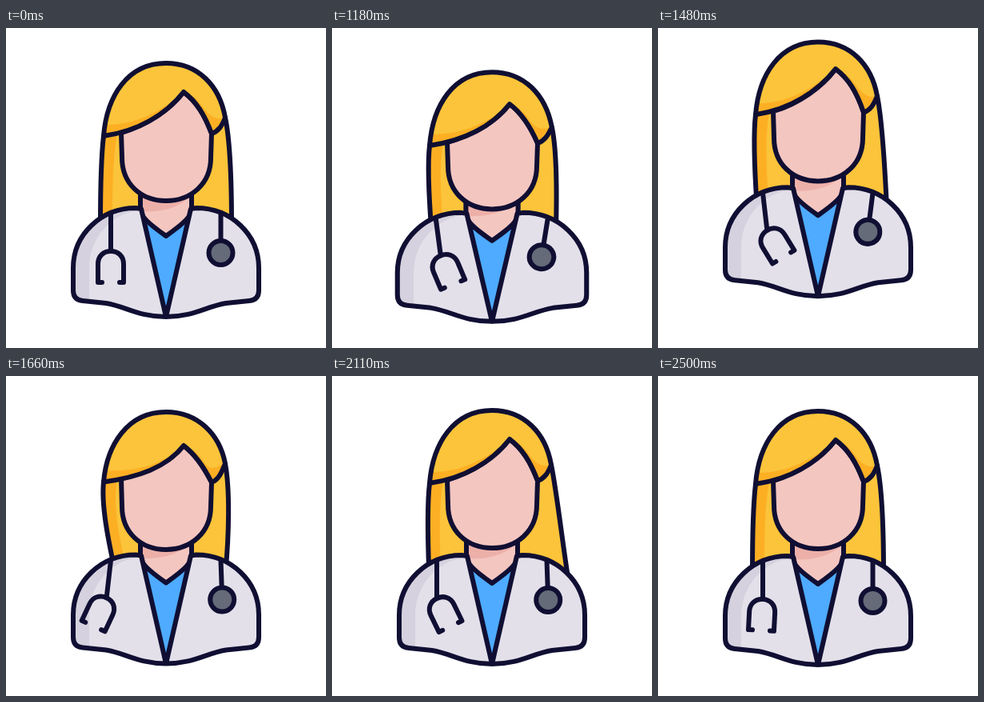
Animation, 400 px wide and 400 px high, one loop 2.53 s. Source, as an HTML page:

```html
<!DOCTYPE html>
<html lang="en">
<head>
<meta charset="utf-8">
<title>Doctor hop</title>
<style>
  html, body { margin: 0; width: 100%; height: 100%; overflow: hidden; background: #fff; }
  svg { display: block; width: 100%; height: 100%; }
  .line { stroke: #100f33; stroke-width: 6; stroke-linecap: round; stroke-linejoin: round; }
</style>
</head>
<body>
<svg viewBox="0 0 400 400" fill="none">
  <path id="back" fill="#fbc43a"/>
  <path id="backShade" fill="#fdaf24"/>
  <path id="backLine" class="line"/>
  <g id="body">
    <path fill="#4eabff" d="M168 226L200 361L232 226Z"/>
    <path fill="#f4c6c0" d="M168 192V226C168 235 176 243 200 260C224 243 232 235 232 226V192Z"/>
    <path fill="#edb0a9" d="M168 192V229C190 231 218 226 232 208V192Z"/>
    <path class="line" d="M168 192V226C168 235 176 243 200 260C224 243 232 235 232 226V192"/>
    <path fill="#e4e0ea" d="M200 361L169 226L162 225C119 225 84 258 84 300V328Q84 340 96 341L125 344C150 348 165 361 200 361C235 361 250 348 275 344L304 341Q316 340 316 328V300C316 258 281 225 238 225L231 226Z"/>
    <path fill="#d5d1de" d="M169 226L162 225C119 225 84 258 84 300V328Q84 340 96 341L104 342V300C104 262 133 229 170 228Z"/>
    <path class="line" d="M200 361L169 226L162 225C119 225 84 258 84 300V328Q84 340 96 341L125 344C150 348 165 361 200 361C235 361 250 348 275 344L304 341Q316 340 316 328V300C316 258 281 225 238 225L231 226Z"/>
    <g id="tube" class="line">
      <path d="M131 232V279"/>
      <path id="fork" d="M120 318H115V295C115 285 122 279 131 279C140 279 147 285 147 295V318H142"/>
    </g>
    <g id="disc" class="line">
      <path d="M268.500 232V266"/>
      <circle cx="268.500" cy="281" r="15" fill="#656b78"/>
    </g>
  </g>
  <path id="face" class="line" fill="#f4c6c0"/>
  <path id="cap" fill="#fbc43a"/>
  <path id="capShade" fill="#fdaf24"/>
  <path id="capLine" class="line"/>
</svg>
<script>
const LOOP = 2530, START = 1030, STEP = 30;
const times = [1000, 1030, 1120, 1300, 1530, 1660, 1780, 1900, 2000, 2110, 2190, 2320, 2500];

// One value per key time: offsets in px, swings in degrees (positive is inward).
const tracks = {
  body:  [0, 3.7, 10, -10.5, -27, -1.5, 10, 3.5, 0, -1, -1.5, 2.8, 0],
  wide:  [0, 1, 3, 0, 0, 0, 3, 2, 0, 0, 0, 0.8, 0],
  head:  [0, 4.5, 16, -8, -28, 1, 30, 21, 6, -1, -3, 2.5, 0],
  nod:   [0, 0.3, 4, 3, -3, 6, 10, 9, 3, 0, 0, 0, 0],
  side:  [0, 0, 2, -2.5, 0, -3.5, 4, 4, 1, 0, 0, 0, 0],
  tipL:  [0, 0, 2, 13, 4, 17, -4, -11, -6, 3, 3, -2, 0],
  tipR:  [0, 0, -2, -1, 4, -7, -12, -16, 0, 11, 8, -3, 0],
  tube:  [0, 0, 4, 12.5, 4, -6.5, 0, 13.5, 8, 0, -3, 1, 0],
  fork:  [0, 0, 10, 44, 25, -25, -20, 32, 42, 26, 5, -8, -3],
  disc:  [0, 0, 4, 17.7, 4, -2, 5, 23, 8, -2, -2, 1, 0]
};

const $ = id => document.getElementById(id);
const draw = (id, d) => $(id).setAttribute('d', d);
const move = (id, value) => $(id).setAttribute('transform', value);

// Monotone cubic through the keys, so extremes fall on the keys.
function sample(v, t) {
  const last = times.length - 1;
  if (t >= times[last]) return v[last];
  let i = 0;
  while (t >= times[i + 1]) i++;
  const slope = k => (v[k + 1] - v[k]) / (times[k + 1] - times[k]);
  const tangent = k => {
    if (k === 0 || k === last) return 0;
    const a = slope(k - 1), b = slope(k);
    return a * b <= 0 ? 0 : 2 * a * b / (a + b);
  };
  const span = times[i + 1] - times[i], u = (t - times[i]) / span, w = 1 - u;
  return v[i] * w * w * (1 + 2 * u) + v[i + 1] * u * u * (3 - 2 * u)
    + span * u * w * (tangent(i) * w - tangent(i + 1) * u);
}

function render(t) {
  const p = {};
  for (const name in tracks) p[name] = t < START ? 0 : sample(tracks[name], t);
  const h = p.head, f = h * 0.93, s = h + p.side, n = h + p.nod;
  const low = h + Math.max(0, p.side);
  const leftY = 135 + s, lockX = 274 + Math.max(0, p.side), lockY = 112 + s;
  const tipY = 247 + p.body, tipL = 118 + p.tipL * 1.1, tipR = 282 + p.tipR * 1.1;

  // Hair behind the shoulders
  const left = `C119 ${160 + h} ${118 + p.tipL * 0.55} ${205 + p.body} ${tipL} ${tipY}`;
  const right = `C${280 + Math.max(0, p.side)} ${140 + h} ${282 + p.tipR * 0.45} ${200 + p.body} ${tipR} ${tipY}`;
  draw('back', `M${lockX} ${lockY}${right}L${tipL} ${tipY}L122 ${leftY}Z`);
  draw('backShade', `M122 ${leftY}${left}H${tipL + 15}C${133 + p.tipL * 0.55} ${205 + p.body} 133 ${165 + h} 139 ${133 + s}Z`);
  draw('backLine', `M122 ${leftY}${left}M${lockX} ${lockY}${right}`);

  const k = 1 + p.wide / 116;
  move('body', `translate(${200 - 200 * k} ${p.body}) scale(${k} 1)`);
  move('tube', `rotate(${-p.tube} 131 232)`);
  move('fork', `rotate(${p.tube - p.fork} 131 279)`);
  move('disc', `rotate(${p.disc} 268.5 232)`);

  const partR = `C248 ${108 + n} 238 ${92 + n} 222 ${80 + n}`;
  const partL = `C200 ${108 + n} 165 ${129 + s} 122 ${leftY}`;
  const lock = `C270 ${122 + s} 266 ${129 + low} 257 ${132 + low}`;
  draw('face', `M257 ${132 + low}L256 ${162 + f}C256 ${195 + f} 231 ${216 + f} 200 ${216 + f}`
    + `C169 ${216 + f} 145 ${195 + f} 145 ${162 + f}L144 ${131 + s}C175 ${122 + s} 205 ${103 + n} 222 ${80 + n}${partR.replace(/.*/, `C238 ${92 + n} 248 ${108 + n} 257 ${132 + low}`)}Z`);

  const cap = `M122 ${leftY}C126 ${85 + h} 152 ${44 + h} 200 ${44 + h}`
    + `C240 ${44 + h} 267 ${72 + h} ${lockX} ${lockY}${lock}${partR}${partL}Z`;
  draw('cap', cap);
  draw('capLine', cap);
  draw('capShade', `M222 ${80 + n}${partL}L125 ${121 + s}C158 ${121 + s} 190 ${108 + n} 222 ${80 + n}Z`
    + `M222 ${80 + n}C237 ${84 + n} 243 ${95 + n} 250 ${104 + n}C258 ${112 + n} 264 ${115 + s} ${lockX} ${lockY}${lock}${partR}Z`);
}

const begin = performance.now();
function tick() {
  const t = (performance.now() - begin) % LOOP;
  render(t < START ? 0 : START + STEP * Math.floor((t - START) / STEP));
  requestAnimationFrame(tick);
}
render(0);
tick();
</script>
</body>
</html>
```
